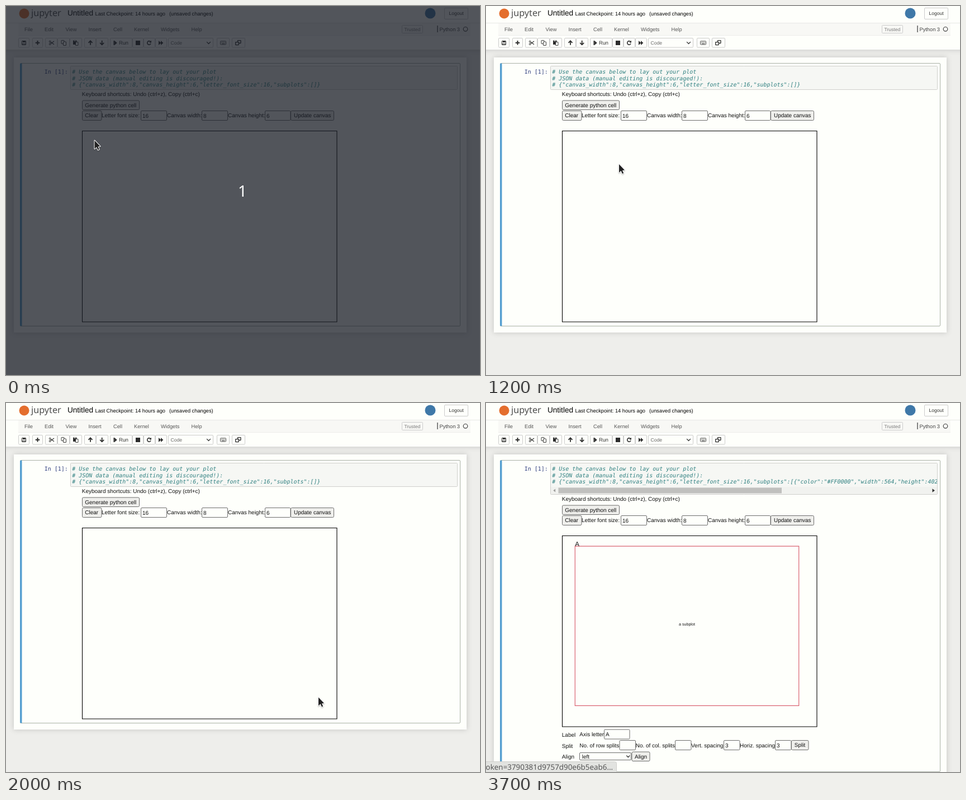
An HTML page with a canvas that plays this animation: 848x660 px, repeating every 4.1 s.

```html
<!DOCTYPE html>
<html lang="en">
<head>
<meta charset="utf-8">
<title>Notebook subplot layout</title>
<style>
html, body { margin: 0; width: 100%; height: 100%; overflow: hidden; background: #eeeeeb; }
canvas { display: block; }
</style>
</head>
<body>
<canvas id="stage" width="848" height="660"></canvas>
<script>
const ctx = document.getElementById('stage').getContext('2d');
ctx.textRendering = 'geometricPrecision';

const LOOP = 4100, STEP = 100;
const SANS = '"Liberation Sans", Arial, sans-serif';
const NOTO = '"Noto Sans", sans-serif';
const MONO = '"DejaVu Sans Mono", monospace';
const PAPER = '#fefffb', INK = '#111', ICON = '#2c2c2c', COMMENT = '#2f8080';
const BODY = 9.975, MENU = 9.26, SMALL = 8.55;

// Pointer path: time, x, y
const PATH = [
  [0, 158.5, 240.5], [1000, 158.5, 240.5], [1100, 171, 247], [1200, 238, 283],
  [1400, 394.5, 374.5], [1500, 464, 420], [1600, 501, 457], [1700, 528, 487],
  [1800, 546, 509], [1900, 556, 522], [2000, 559, 526.5], [3100, 559, 526.5],
  [3200, 295, 306], [3300, 295, 306], [3400, 195, 172], [3500, 92, 33]
];

function text(str, x, y, size = BODY, color = INK, family = SANS, style = '') {
  ctx.font = `${style} ${size}px ${family}`;
  ctx.fillStyle = color;
  ctx.fillText(str, x, y);
}

function box(x0, y0, x1, y1, fill, stroke, r = 0, width = 1) {
  ctx.beginPath();
  ctx.roundRect(x0, y0, x1 - x0, y1 - y0, r);
  if (fill) { ctx.fillStyle = fill; ctx.fill(); }
  if (stroke) { ctx.strokeStyle = stroke; ctx.lineWidth = width; ctx.stroke(); }
}

function trace(points) {
  ctx.beginPath();
  points.forEach(([x, y]) => ctx.lineTo(x, y));
}

function poly(points, fill = ICON) {
  trace(points);
  ctx.fillStyle = fill;
  ctx.fill();
}

function line(points, color = ICON, width = 1) {
  trace(points);
  ctx.strokeStyle = color;
  ctx.lineWidth = width;
  ctx.stroke();
}

function disc(x, y, r, fill, stroke, width = 1) {
  ctx.beginPath();
  ctx.arc(x, y, r, 0, Math.PI * 2);
  if (fill) { ctx.fillStyle = fill; ctx.fill(); }
  if (stroke) { ctx.strokeStyle = stroke; ctx.lineWidth = width; ctx.stroke(); }
}

function shadowed(x0, y0, x1, y1) {
  ctx.save();
  ctx.shadowColor = 'rgba(87,87,87,.28)';
  ctx.shadowBlur = 9;
  box(x0, y0, x1, y1, PAPER);
  ctx.restore();
}

const chevron = (x, y, s) => line([[x - s, y - s / 2], [x, y + s / 2], [x + s, y - s / 2]], '#333', 1.3);

const button = (label, x0, y0, x1, y1, tx) => {
  box(x0 + .5, y0 + .5, x1 - .5, y1 - .5, '#efefec', '#6d6d6d', 2);
  text(label, tx, y0 + 12);
};

const field = (value, x0, y0, x1) => {
  box(x0 + .5, y0 + .5, x1 - .5, y0 + 17.5, PAPER, '#6d6d6d', 1.5);
  text(value, x0 + 3, y0 + 12.5);
};

function header() {
  shadowed(-20, -20, 868, 78);
  disc(32.5, 13.5, 9, '#e46e2e');
  text('jupyter', 45, 18, 16.2, '#4e4e4e', NOTO);
  text('Untitled', 110, 17.3, 13.57, '#000');
  text('Last Checkpoint: 14 hours ago', 159.5, 17, MENU, '#000');
  text('(unsaved changes)', 292, 17, MENU, '#000');
  disc(759, 13, 9.5, '#3f78a8');
  box(784.5, 3.5, 826.5, 23.5, PAPER, '#ccc', 1.5);
  text('Logout', 792.5, 16.3, SMALL, '#333');

  line([[0, 30.5], [848, 30.5]], '#e7e7e5');
  box(22, 31, 831, 52, '#f8f8f5');
  line([[22, 52.5], [831, 52.5]], '#ececea');
  [['File', 33], ['Edit', 69], ['View', 106.5], ['Insert', 147.5], ['Cell', 192],
   ['Kernel', 229], ['Widgets', 277], ['Help', 331.5]]
    .forEach(([label, x]) => text(label, x, 44.7, MENU, '#555'));
  box(708.5, 34.5, 745.5, 48.5, null, '#ccc', 1);
  text('Trusted', 712.5, 44.7, SMALL, '#777');
  line([[772, 35], [772, 47]], '#333', 1.2);
  text('Python 3', 775.5, 44.7, MENU, '#444');
  disc(822, 41.3, 3.8, null, '#444', 1.2);
}

function toolbar(focused) {
  const edges = [[22, 42], [47, 66], [70, 92], [92, 114], [114, 136], [140, 161], [161, 183],
    [186, 226], [226, 246], [246, 267], [267, 288], [290, 371], [377, 400], [404, 428]];
  edges.forEach(([a, b]) => box(a + .5, 57.5, b - .5, 74, PAPER, '#ccc', 1.5));
  if (focused) box(405, 58, 427, 73.5, '#e8e8e5', '#000', 2.5, 2);

  // Save, add
  box(28.5, 62.5, 35.5, 69.5, null, ICON, .5);
  box(30, 62, 34.5, 65, ICON);
  box(30, 67, 34, 69, null, ICON, 0, .8);
  line([[56.5, 62], [56.5, 69.5]], ICON, 2);
  line([[52.7, 65.8], [60.3, 65.8]], ICON, 2);

  // Cut, copy, paste
  disc(78.7, 63.6, 1.4, null, ICON);
  disc(78.7, 68.2, 1.4, null, ICON);
  line([[79.8, 64.5], [86, 68.8]], ICON, 1.1);
  line([[79.8, 67.4], [86, 63]], ICON, 1.1);
  box(99, 61.5, 104, 67.5, PAPER, ICON, .5, .9);
  box(102.5, 64, 107.5, 70.5, PAPER, ICON, .5, .9);
  box(120, 61.5, 126.5, 69, ICON, null, .5);
  box(121.7, 62, 124.7, 63, PAPER);
  box(124.5, 64.5, 129, 70.5, PAPER, ICON, .3, .9);

  // Move up, move down
  for (const [x, d] of [[151, 1], [171.7, -1]]) {
    line([[x, 65.8 + 4 * d], [x, 65.8 - 3 * d]], ICON, 1.8);
    line([[x - 3.5, 65.8], [x, 65.8 - 3.5 * d], [x + 3.5, 65.8]], ICON, 1.8);
  }

  // Run, stop, restart, run all
  box(192.5, 62, 194, 70, ICON);
  poly([[194.2, 62], [198.7, 66], [194.2, 70]]);
  text('Run', 202, 69.2, MENU, '#333');
  box(232, 62, 240, 70, ICON);
  ctx.beginPath();
  ctx.arc(256, 66, 3.2, .4, Math.PI * 1.75);
  ctx.strokeStyle = ICON;
  ctx.lineWidth = 1.6;
  ctx.stroke();
  poly([[260, 61.8], [260, 65.6], [256.3, 65.6]]);
  for (const x of [273, 277]) poly([[x, 62], [x + 4.3, 66], [x, 70]]);

  // Cell type, shortcuts, extension
  text('Code', 294.5, 69, SMALL, '#666');
  chevron(362.5, 65.8, 3.4);
  box(383.5, 62.8, 393.5, 69, null, '#444', .7, .9);
  for (const y of [64.7, 66.2]) {
    ctx.setLineDash([1, .8]);
    line([[385, y], [392.5, y]], '#444', .9);
  }
  ctx.setLineDash([]);
  line([[386, 67.7], [391.5, 67.7]], '#444', .9);
  box(414.5, 61.7, 420, 66.5, PAPER, ICON, .4, 1.3);
  box(410.7, 64.7, 416.2, 69.7, PAPER, ICON, .4, 1.3);
}

function cell(plotted) {
  const dy = plotted ? 14.2 : 0;
  const bottom = plotted ? 659.5 : 572.5;
  shadowed(14, 92, 824, plotted ? 700 : 584);
  box(25.5, 102.5, 812.5, bottom, PAPER, '#a9b0a6', 1.5);
  box(25, 102.5, 28.5, bottom, '#559fd0', null, [1.5, 0, 0, 1.5]);

  text('In [1]:', 68.7, 121.2, BODY, '#303f7f', MONO);
  box(115.5, 107.5, 807.5, plotted ? 163.5 : 149.5, '#f6f7f4', '#cfcfcc', 1);
  const tail = plotted ? '[{"color":"#FF0000","width":564,"height":402' : '[]}';
  ctx.save();
  ctx.beginPath();
  ctx.rect(116, 108, 691, 56);
  ctx.clip();
  ['# Use the canvas below to lay out your plot',
   '# JSON data (manual editing is discouraged!):',
   '# {"canvas_width":8,"canvas_height":6,"letter_font_size":16,"subplots":' + tail]
    .forEach((s, i) => text(s, 118.3, 121.2 + i * 11.4, BODY, COMMENT, MONO, 'italic'));
  ctx.restore();
  if (plotted) {
    box(116, 150, 807, 163, '#f1f2ef');
    box(129.5, 151.5, 529, 161.5, '#c0c0be');
    poly([[124.2, 153.5], [124.2, 159.5], [120.2, 156.5]], '#a0a09e');
    poly([[798.5, 153.3], [798.5, 159.7], [803, 156.5]], '#333');
  }

  ctx.save();
  ctx.translate(0, Math.round(dy));
  text('Keyboard shortcuts: Undo (ctrl+z), Copy (ctrl+c)', 135.8, 160.6);
  button('Generate python cell', 136, 168.5, 239, 186, 141.3);
  button('Clear', 136, 187, 171.5, 205, 141.3);
  text('Letter font size:', 171, 198.6);
  field('16', 241, 187, 288);
  text('Canvas width:', 288, 199.4);
  field('8', 350, 187, 397);
  text('Canvas height:', 397, 199.4);
  field('6', 463, 187, 509.5);
  button('Update canvas', 509, 187, 587, 205, 515);
  box(136.5, 223.5, 592, 565, PAPER, '#000', 0, 1.1);
  ctx.restore();
  if (plotted) subplot();
}

function subplot() {
  box(159.3, 256.2, 559.7, 541.4, null, '#da6473', 0, 1.2);
  text('A', 159.2, 256, 11.4);
  text('a subplot', 345, 398.4, 7.125);

  text('Label', 135.8, 596.5);
  text('Axis letter', 167.3, 595.5);
  field('A', 211, 583.5, 257.5);
  text('Split', 135.8, 616.5);
  text('No. of row splits', 167.3, 615.5);
  field('', 238.5, 603, 268);
  text('No. of col. splits', 267.7, 615.5);
  field('', 338, 603, 367.5);
  text('Vert. spacing', 367, 615.5);
  field('3', 425, 603, 454.5);
  text('Horiz. spacing', 454, 615.5);
  field('3', 517, 603, 546.5);
  button('Split', 546, 603, 577.5, 621, 551.8);
  text('Align', 135.8, 635.8);
  box(167.5, 625.5, 259.5, 638.5, PAPER, '#6d6d6d', 1.5);
  text('left', 171.8, 635.6);
  chevron(254.3, 632, 3);
  button('Align', 260.5, 623.5, 293.5, 641, 266);
  text('Copy', 135.8, 652.7);
  text('Press ctrl+c', 167.5, 652.7);
}

function pointerAt(t) {
  const i = PATH.findIndex(p => p[0] > t);
  const [t0, x0, y0] = PATH[i < 0 ? PATH.length - 1 : i - 1];
  if (i < 0) return [x0, y0];
  const [t1, x1, y1] = PATH[i];
  const k = (t - t0) / (t1 - t0);
  return [x0 + (x1 - x0) * k, y0 + (y1 - y0) * k];
}

function pointer([x, y]) {
  ctx.save();
  ctx.translate(x, y);
  ctx.shadowColor = 'rgba(0,0,0,.3)';
  ctx.shadowBlur = 2;
  ctx.shadowOffsetY = 1;
  trace([[0, 0], [0, 15], [3.5, 11.8], [6, 17], [8.2, 16], [5.9, 10.9], [10, 10.5]]);
  ctx.closePath();
  ctx.lineJoin = 'round';
  ctx.lineWidth = 2;
  ctx.strokeStyle = '#fff';
  ctx.stroke();
  ctx.shadowColor = 'transparent';
  ctx.fillStyle = '#222';
  ctx.fill();
  ctx.restore();
}

function statusBar(alpha) {
  ctx.save();
  ctx.globalAlpha = alpha;
  box(-5, 641.5, 233.5, 665, '#e2e3e0', '#cfcfcc', 3);
  ctx.textAlign = 'right';
  text('oken=3790381d9757d90e6b5eab6…', 227, 656, 13.4, '#555', NOTO);
  ctx.restore();
}

function countdown() {
  box(0, 0, 848, 660, 'rgba(24,29,38,.75)');
  ctx.textAlign = 'center';
  text('1', 423, 341, 28, '#fff', NOTO);
  ctx.textAlign = 'left';
}

function draw(now) {
  const t = Math.floor(now % LOOP / STEP) * STEP;
  box(0, 0, 848, 660, '#eeeeeb');
  cell(t >= 2800);
  header();
  toolbar(t === 1000);
  if (t < 100) countdown();
  if (t < 3600) pointer(pointerAt(t));
  else statusBar(t < 3700 ? .6 : 1);
}

const start = performance.now();
function tick() {
  draw(performance.now() - start);
  requestAnimationFrame(tick);
}
tick();
</script>
</body>
</html>
```
